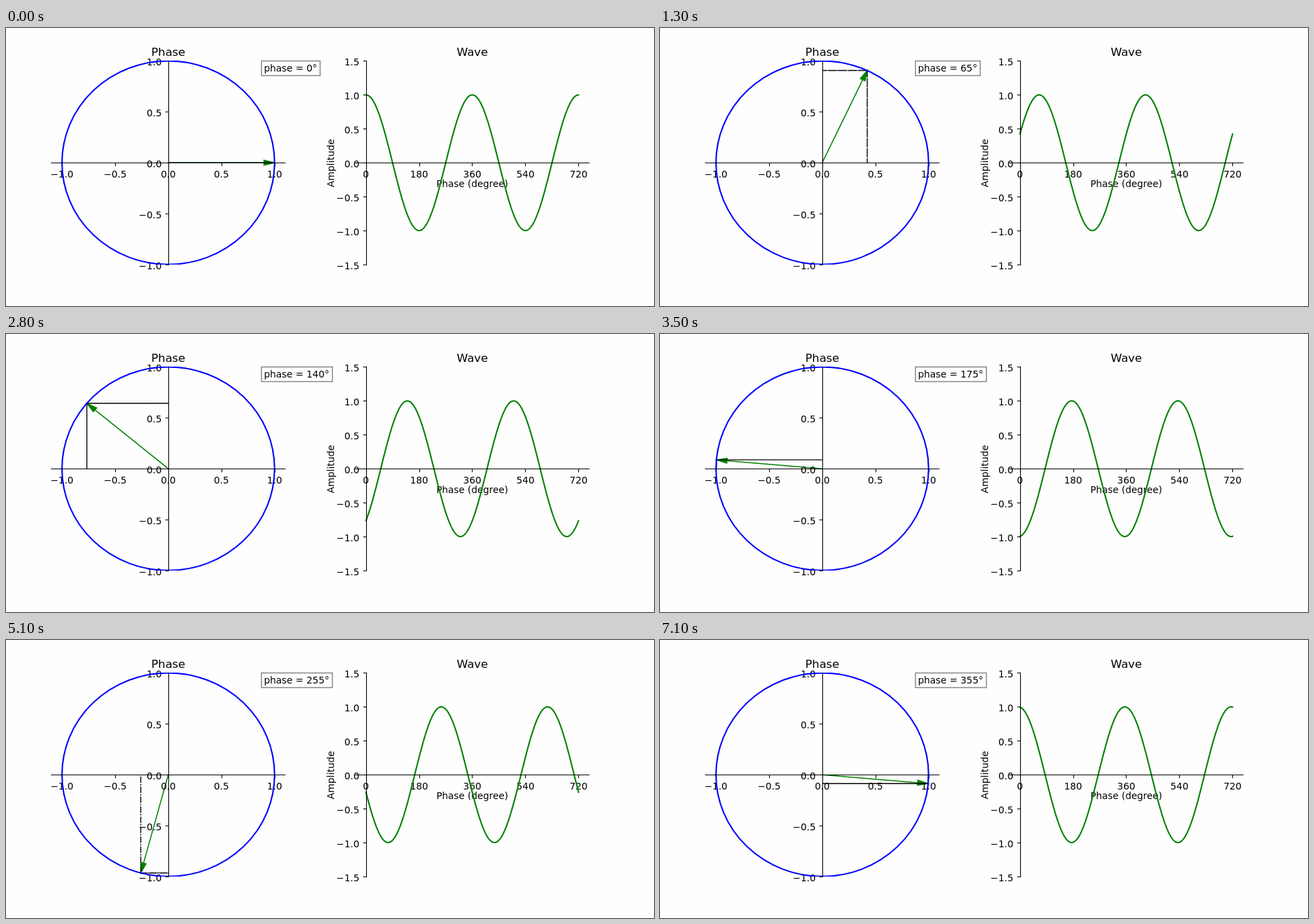
Recreate the animation shown at these times as an HTML page with a canvas. Size 950 by 409 pixels, loop 7.2 s.

```html
<!DOCTYPE html>
<html>
<head>
<meta charset="utf-8">
<style>
html, body { margin: 0; overflow: hidden; background: #fefefe; }
canvas { display: block; }
</style>
</head>
<body>
<canvas width="950" height="409"></canvas>
<script>
const ctx = document.querySelector('canvas').getContext('2d');
const PT = 100 / 72;                    // points to pixels
const TOP = 48.5, MID = 198.2, BOTTOM = 347.9;
const LEFT = { x0: 237.91, sx: 155.83, sy: 149.7, from: 66.5, to: 409.3,
  xTicks: [-1, -0.5, 0, 0.5, 1], yTicks: [-1, -0.5, 0, 0.5, 1], digits: 1 };
const RIGHT = { x0: 527.76, sx: 0.43286, sy: 99.8, from: 512.2, to: 855,
  xTicks: [0, 180, 360, 540, 720], yTicks: [-1.5, -1, -0.5, 0, 0.5, 1, 1.5], digits: 0 };

const snap = v => Math.floor(v + 0.4) + 0.5;
const label = (v, digits) => v.toFixed(digits).replace('-', '−');

function text(str, x, y, align = 'center', size = 10) {
  ctx.font = `${size * PT}px "DejaVu Sans", sans-serif`;
  ctx.textAlign = align;
  ctx.fillStyle = '#000';
  ctx.fillText(str, x, y);
}

function line(points, color, width, cap = 'butt') {
  ctx.beginPath();
  points.forEach(p => ctx.lineTo(...p));
  ctx.strokeStyle = color;
  ctx.lineWidth = width;
  ctx.lineCap = cap;
  ctx.stroke();
}

function ticks(ax) {
  const x = snap(ax.x0), y = snap(MID);
  for (const v of ax.xTicks) {
    const px = ax.x0 + v * ax.sx;
    line([[snap(px), y], [snap(px), y + 4.86]], '#000', 1.11);
    text(label(v, ax.digits), px, 220);
  }
  for (const v of ax.yTicks) {
    const py = snap(MID - v * ax.sy);
    line([[x, py], [x - 4.86, py]], '#000', 1.11);
    text(label(v, 1), ax.x0 - 9.7, py + 6, 'right');
  }
}

function spines(ax) {
  line([[ax.from, snap(MID)], [ax.to, snap(MID)]], '#000', 1.11, 'square');
  line([[snap(ax.x0), snap(TOP)], [snap(ax.x0), snap(BOTTOM)]], '#000', 1.11, 'square');
}

function clipped(ax, paint) {
  ctx.save();
  ctx.beginPath();
  ctx.rect(Math.round(ax.from), 48, Math.round(ax.to - ax.from), 300);
  ctx.clip();
  paint();
  ctx.restore();
}

function arrow(angle) {
  const c = Math.cos(angle), s = Math.sin(angle);
  const at = (u, v) => [LEFT.x0 + (u * c - v * s) * LEFT.sx, MID - (u * s + v * c) * LEFT.sy];
  line([at(0, 0), at(0.9, 0)], 'green', 1.5);
  ctx.beginPath();
  [at(1, 0), at(0.9, 0.025), at(0.9, -0.025)].forEach(p => ctx.lineTo(...p));
  ctx.closePath();
  ctx.fillStyle = 'green';
  ctx.fill();
  ctx.lineWidth = PT;
  ctx.stroke();

  // each projection runs to the axis and back, so its dashes overlap
  const tip = at(1, 0);
  ctx.setLineDash([6.4, 1.6, 1, 1.6].map(d => d * PT));
  for (const foot of [[LEFT.x0, tip[1]], [tip[0], MID]])
    if (Math.hypot(foot[0] - tip[0], foot[1] - tip[1]) > 0.01)
      line([tip, foot, tip], '#000', PT);
  ctx.setLineDash([]);
}

function phaseBox(degrees) {
  const str = `phase = ${degrees}°`;
  ctx.font = `${10 * PT}px "DejaVu Sans", sans-serif`;
  const width = Math.round(ctx.measureText(str).width + 8.3);
  ctx.fillStyle = 'rgba(255,255,255,0.5)';
  ctx.strokeStyle = 'rgba(0,0,0,0.5)';
  ctx.lineWidth = PT;
  ctx.fillRect(374.5, 48.5, width, 21.5);
  ctx.strokeRect(374.5, 48.5, width, 21.5);
  text(str, 378.2, 64, 'left');
}

function draw(degrees) {
  const phase = degrees * Math.PI / 180;
  ctx.fillStyle = '#fefefe';
  ctx.fillRect(0, 0, 950, 409);

  clipped(LEFT, () => arrow(phase));
  ticks(LEFT);
  clipped(LEFT, () => {
    ctx.beginPath();
    ctx.ellipse(LEFT.x0, MID, LEFT.sx, LEFT.sy, 0, 0, 2 * Math.PI);
    ctx.strokeStyle = 'blue';
    ctx.lineWidth = 1.5 * PT;
    ctx.stroke();
  });
  spines(LEFT);
  text('Phase', LEFT.x0, 41, 'center', 12);
  phaseBox(degrees);

  ticks(RIGHT);
  text('Phase (degree)', 683.6, 234);
  ctx.save();
  ctx.translate(480.5, 198.7);
  ctx.rotate(-Math.PI / 2);
  text('Amplitude', 0, 0);
  ctx.restore();
  const wave = Array.from({ length: 361 }, (_, i) => [
    RIGHT.x0 + 2 * i * RIGHT.sx,
    MID - RIGHT.sy * Math.cos(2 * i * Math.PI / 180 - phase)
  ]);
  line(wave, 'green', 1.5 * PT, 'square');
  spines(RIGHT);
  text('Wave', 683.6, 41, 'center', 12);
}

function tick() {
  draw(Math.floor(performance.now() / 100) % 72 * 5);
  requestAnimationFrame(tick);
}
tick();
</script>
</body>
</html>
```
